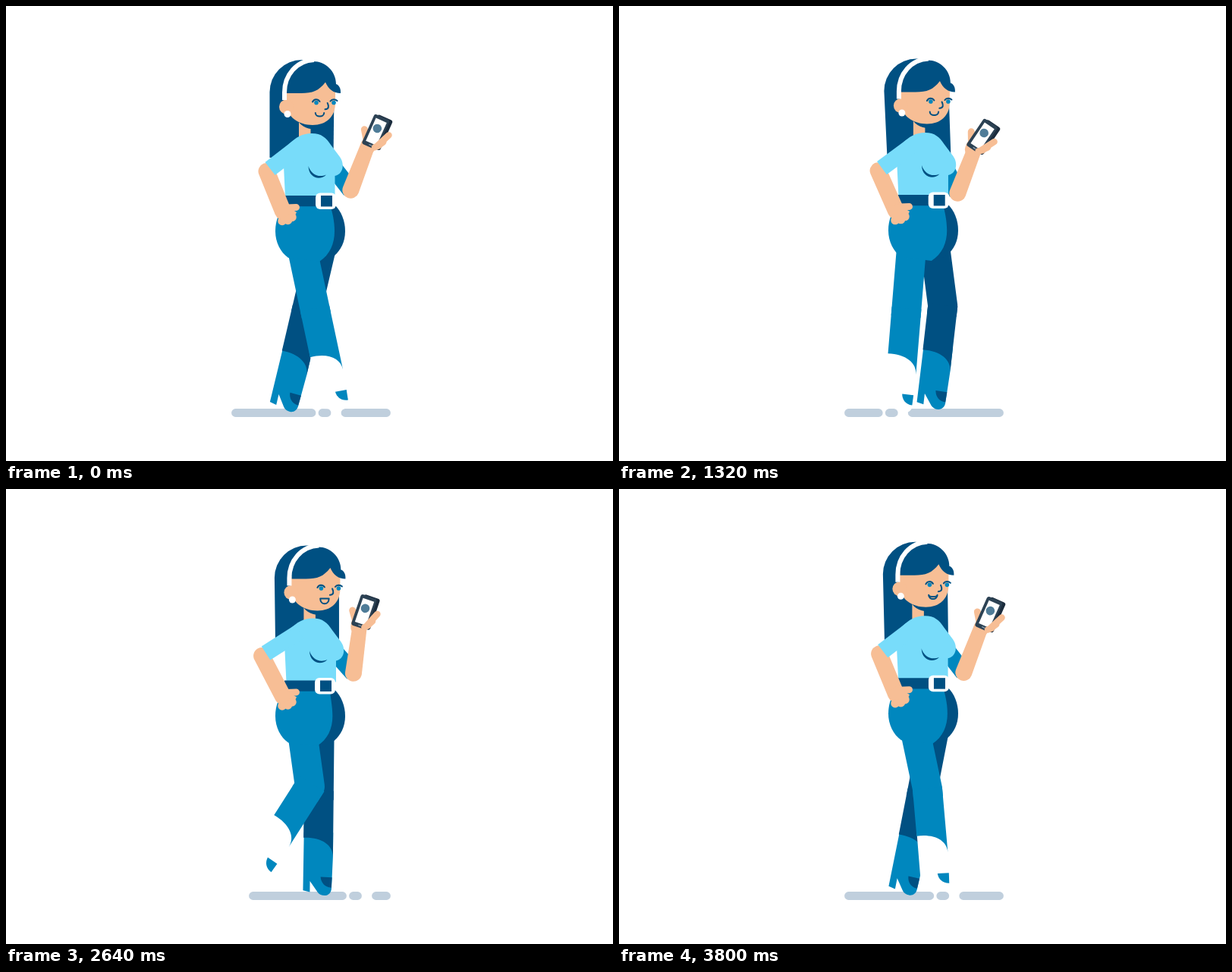
Recreate the animation shown at these times as an HTML page. Size 800x600 px, loop 3840 ms.

```html
<!DOCTYPE html>
<html lang="en">
<head>
<meta charset="utf-8">
<title>Walking with a phone</title>
<style>
html, body { margin: 0; width: 100%; height: 100%; overflow: hidden; background: #fff; }
svg { display: block; width: 800px; height: 600px; }
.dark { fill: #005082; }
.mid { fill: #0087be; }
.light { fill: #78dcfa; }
.skin { fill: #f7be95; }
.white { fill: #fff; }
.line { fill: none; stroke: #005082; stroke-width: 2; stroke-linecap: round; stroke-linejoin: round; }
.limb { fill: none; stroke: #f7be95; stroke-linecap: round; }
.pants { fill: none; stroke-width: 39; stroke-linejoin: round; }
</style>
</head>
<body>
<svg id="stage" viewBox="0 0 800 600"></svg>
<script>
const FRAME = 40, FRAMES = 96, STEP = 24, STANCE = 13, SWING = STEP - STANCE;
const GROUND_SPEED = 6.75;

// lift: frame at which the foot leaves the ground; snap: how early the thigh swings forward
const LEGS = {
  near: { hip: 386, lift: 13, bend: 41, snap: 3, twist: 3 },
  far: { hip: 413, lift: 0, bend: 33, snap: 1, twist: 7 }
};

const legMarkup = (id, pants, boot, accent) => `
  <polyline id="${id}Thigh" class="pants" stroke="${pants}"/>
  <g id="${id}Shin">
    <path fill="${boot}" d="M-19 55H19.5V87L18 128C18 134 14 138 9 138C5 138 2 136.5 0 134L-10.5 119V133.5L-19.5 131.5Z"/>
    <path fill="${accent}" d="M3.5 113.5L18.5 114L17.8 127.5C9 127 4 121 3.5 113.5Z"/>
    <path fill="${pants}" d="M-19.5 0V62C4 61 19.5 71 19.5 87V0Z"/>
  </g>`;

document.getElementById("stage").innerHTML = `
  <path id="ground" d="M302.5 536.5H501.5" fill="none" stroke="#c0cfdd" stroke-width="10.8"
    stroke-linecap="round" stroke-dasharray="118 14 6 24"/>
  <path id="hair" class="dark"/>
  <line id="farSleeve" stroke="#0087be" stroke-width="23"/>
  <path id="forearm" class="skin" d="M-11 0L-9.5-66H9.5L11 0A11 11 0 0 1-11 0Z"/>
  <g id="phone">
    <path class="limb" stroke-width="19" d="M9 17L10 22"/>
    <path class="limb" stroke-width="9" d="M-4 3L3 13"/>
    <rect x="4" y="-22.5" width="22" height="43" rx="3" fill="#1b2c3d"/>
    <rect y="-21.5" width="22" height="43" rx="3" fill="#2c4254"/>
    <rect class="white" x="3.8" y="-17" width="15.5" height="33"/>
    <circle cx="11" cy="-5" r="5.8" fill="#4f7c98"/>
    <path d="M9.5 18.7H13.5" stroke="#8ba0b0" stroke-width="1.3"/>
    <path class="limb" stroke-width="8.5" d="M20 17L28.5-3M21 16L25.5 8M18 19L22 15"/>
  </g>
  ${legMarkup("far", "#005082", "#0087be", "#005082")}
  <path id="farHip" class="dark" d="M423 262H433C442 271 447 283 447 297C447 311 441 322 433 329L413 342Z"/>
  ${legMarkup("near", "#0087be", "#fff", "#0087be")}
  <path id="nearHip" class="mid"/>
  <path id="neck" class="skin" d="M386 150H401.5V178H386Z"/>
  <g id="torso">
    <path class="light" d="M366 211L372 183C382 173 391 168 403 168C416 168 422 174 428 183L440 199C447 209 444 222 433.5 224V252H368Z"/>
    <path class="dark" d="M398.5 211C402 222 412 227 422 222.5C414 231 399 227 398.5 211Z"/>
  </g>
  <g id="belt">
    <path class="dark" d="M368 250H412V264.3H368Z"/>
    <rect class="white" x="408" y="246.5" width="27" height="21.5" rx="6"/>
    <rect class="dark" x="415" y="250" width="15" height="14.5"/>
  </g>
  <line id="nearArm" class="limb" stroke-width="22"/>
  <g id="fist">
    <path class="limb" stroke-width="9" d="M370 266L382.5 265.5"/>
    <path class="skin" d="M354 268L366 261L383 272L377 284L362 287Z"/>
    <path class="limb" stroke-width="11.5" d="M364 283.5h0M371.5 282.5h0M377 278.5h0"/>
  </g>
  <line id="nearSleeve" stroke="#78dcfa" stroke-width="21.5"/>
  <g id="head">
    <path class="dark" d="M382 145.5H426C424 157.5 416 162.5 406 162.5C396 162.5 386 157.5 382 145.5Z"/>
    <path class="skin" d="M369 112L400 97H434V128C434 146 422 157 404 157C386 157 370 146 369 130Z"/>
    <circle class="skin" cx="369.5" cy="133" r="9.5"/>
    <path class="dark" d="M370 115C369 90 386 73 405 73C421 73 435 86 435 103C439 104 441.5 109 441 115C432 115 425 110 421 100.5C412 112 404 115 389 115Z"/>
    <path fill="none" stroke="#fff" stroke-width="6" d="M367 124V114C367 91 383 72 406 71"/>
    <circle class="white" cx="371" cy="142.5" r="4.5"/>
    <path class="line" d="M423.7 128C425.5 132 426 136 420.5 136.3"/>
    <g id="open">
      <circle class="mid" cx="409" cy="127.5" r="2.8"/>
      <circle class="mid" cx="432" cy="127.5" r="2.8"/>
      <path class="line" d="M404 126.5C406 122.3 411 122.3 413.5 126M427.5 125.5C429.5 122.5 434 122.5 436.5 125"/>
    </g>
    <path id="shut" class="line" d="M404 126C405 131.3 412 131.3 413.5 126M427 126C428.5 131.3 435 131.3 436.5 126"/>
    <path id="mouth" class="line"/>
  </g>`;

const el = {};
document.querySelectorAll("[id]").forEach(n => el[n.id] = n);
const set = (id, attrs) => { for (const k in attrs) el[id].setAttribute(k, attrs[k]); };
const move = (id, x, y, turn = 0) => set(id, { transform: `translate(${x} ${y}) rotate(${turn})` });
const rad = deg => deg * Math.PI / 180;
const wave = u => Math.cos(2 * Math.PI * u);
const ramp = (t, from, to) => {
  const u = Math.min(1, Math.max(0, (t - from) / (to - from)));
  return u * u * (3 - 2 * u);
};

// The foot swings forward with a bent knee, then the straight leg travels back with the ground.
function poseLeg(id, p) {
  const leg = LEGS[id], since = (p - leg.lift + STEP) % STEP;
  let thigh, bend = 0, shift;
  if (since < SWING) {
    const u = since / SWING;
    thigh = -13.2 + 25.2 * (1 - (1 - u) ** leg.snap);
    bend = leg.bend * Math.sin(Math.PI * u) ** 1.4;
    shift = 1 - u;
  } else {
    thigh = 12 - 25.2 * ((since - SWING) / STANCE) ** 1.12;
    shift = Math.max(0, -thigh / 13);
  }
  const squash = 0.12 * bend, shin = thigh - bend;
  const reach = bend ? -squash : 118 * (1 / Math.cos(rad(thigh)) - 1);
  const hip = leg.hip + leg.twist * shift;
  const x = hip + (98 - squash) * Math.sin(rad(thigh));
  const y = 300 + (98 - squash) * Math.cos(rad(thigh));
  const dx = Math.sin(rad(shin)), dy = Math.cos(rad(shin));
  set(id + "Thigh", { points: `${hip},300 ${x},${y} ${x + 12 * dx},${y + 12 * dy}` });
  move(id + "Shin", x + reach * dx, y + reach * dy, -shin);
}

function poseBody(lean, drop) {
  const edge = 433 - 2.7 * lean;
  set("nearHip", { d: `M369 262C360 270 355 283 355 297C355 312 362 325 372 332L${413 - 4 * lean} 337
    C${edge - 6} 328 ${edge} 313 ${edge} 297C${edge} 283 ${edge - 3} 272 427 262Z` });
  move("nearHip", 0, drop);
  move("farHip", 0, drop);
  move("belt", -lean, drop);
  move("torso", 1.5 * lean, drop);
}

function poseHead(x, y, swing) {
  move("neck", x, y);
  move("head", x, y);
  const left = 347.5 + x;
  set("hair", { d: `M${left + swing} 200L${left} ${113.5 + y}a42.5 42.5 0 0 1 85 0L${left + 84 + swing} 200Z` });
}

function poseNearArm(lean, drop, push) {
  const ex = 343.5 - 6.5 * lean, ey = 218 + 0.8 * drop;
  const sx = 385 + 1.5 * lean, sy = 186 + drop;
  set("nearArm", { x1: ex, y1: ey, x2: 365, y2: 271 + drop + push });
  move("fist", 0, drop + push);
  set("nearSleeve", { x1: sx, y1: sy, x2: sx + (ex - sx) * 0.89, y2: sy + (ey - sy) * 0.89 });
}

function posePhone(frame, lean, drop) {
  const sink = ramp(frame, 0, 20) - ramp(frame, 42, 55);
  const angle = 21 - 17 * (ramp(frame, 42, 55) - ramp(frame, 55, 92));
  const x = 460 - 0.27 * angle - 8 * sink;
  const y = 239 + 0.18 * angle + 5 * sink + drop;
  const c = Math.cos(rad(angle)), s = Math.sin(rad(angle));
  set("farSleeve", { x1: 425 + 1.5 * lean, y1: 205 + drop, x2: x, y2: y });
  move("forearm", x, y, angle);
  move("phone", x - 7.7 * c + 84 * s, y - 7.7 * s - 84 * c, 16 + 0.38 * angle + 10 * sink);
}

function poseFace(frame) {
  const talk = ramp(frame, 34, 42) - ramp(frame, 86, 100);
  const round = ramp(frame, 34, 42) - ramp(frame, 55, 64);
  const w = 5.7 - 1.6 * round, y = 141 + 2 * round;
  const up = 6 * (1 - talk) ** 2 - 4.5 * round, low = 6 + 3 * talk - 4.2 * round;
  set("mouth", { d: `M${413.5 - w} ${y}c0 ${up} ${2 * w} ${up} ${2 * w} 0c0 ${low} ${-2 * w} ${low} ${-2 * w} 0Z` });
  const blink = Math.abs(frame - 55) < 3;
  set("open", { visibility: blink ? "hidden" : "visible" });
  set("shut", { visibility: blink ? "visible" : "hidden" });
}

function draw(frame) {
  const p = frame % STEP;
  // q runs from one footfall to the next
  const q = p < SWING ? p / SWING : (p - SWING) / STANCE;
  const lean = (1 - wave(q)) / 2;
  const drop = 1.5 + 2.6 * wave(q - 0.35);
  const swing = Math.max(0, 4.5 * wave(q - 0.75));

  set("ground", { "stroke-dashoffset": 17.5 + GROUND_SPEED * p });
  poseLeg("near", p);
  poseLeg("far", p);
  poseBody(lean, drop);
  poseHead(6.5 * lean, 1.4 * drop, swing);
  poseNearArm(lean, drop, 4 * (ramp(frame, 32, 42) - ramp(frame, 42, 52)));
  posePhone(frame, lean, drop);
  poseFace(frame);
}

let start;
function tick(now) {
  if (start === undefined) start = now;
  draw(Math.floor(Math.max(0, now - start) / FRAME) % FRAMES);
  requestAnimationFrame(tick);
}
draw(0);
requestAnimationFrame(tick);
</script>
</body>
</html>
```
